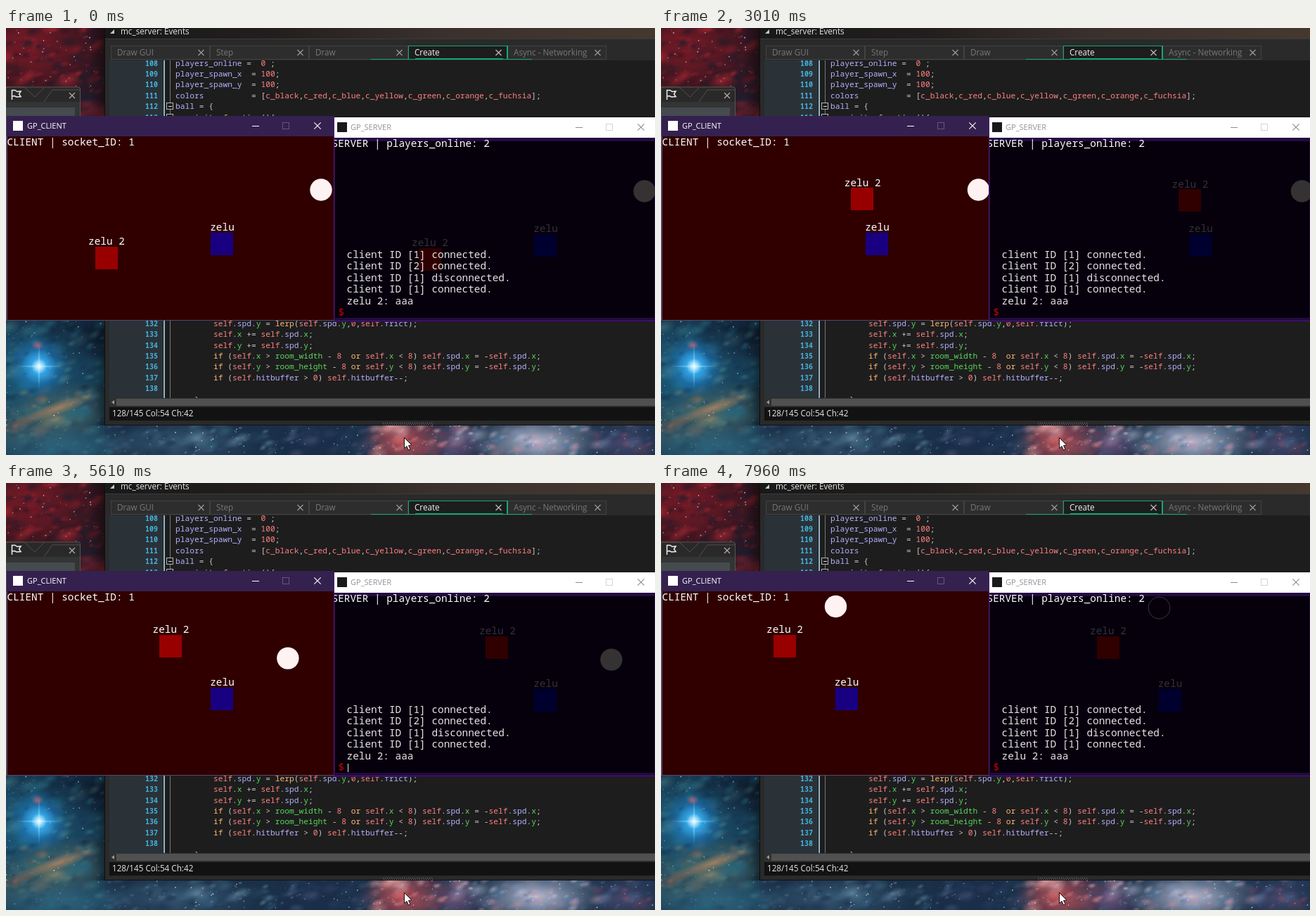
Write an HTML page with a canvas that moves like this. It is 923x607 px and loops after 8 s.

```html
<!DOCTYPE html>
<html lang="en">
<head>
<meta charset="utf-8">
<title>Client and server</title>
<style>
html, body { margin: 0; width: 100%; height: 100%; overflow: hidden; background: #111; }
canvas { display: block; width: 923px; height: 607px; }
</style>
</head>
<body>
<canvas id="stage" width="923" height="607"></canvas>
<script>
const W = 923, H = 607, LOOP = 8000, STEP = 46.3;
const UI = '11.7px "Open Sans", sans-serif';
const TITLE = '11px "Open Sans", sans-serif';
const CODE = '11.25px "Noto Sans Mono", monospace';
const GAME = '300 14.4px "Noto Sans Mono", monospace';
const NAME = 'zelu';

const view = document.getElementById('stage').getContext('2d');
const back = document.createElement('canvas');
back.width = W;
back.height = H;
let g = back.getContext('2d');

function rect(x, y, w, h, fill) {
  g.fillStyle = fill;
  g.fillRect(x, y, w, h);
}
function text(s, x, y, font, fill, align = 'left') {
  g.font = font;
  g.textAlign = align;
  g.fillStyle = fill;
  g.fillText(s, x, y);
}
function path(points, stroke, width = 1, fill) {
  g.beginPath();
  points.forEach(([x, y]) => g.lineTo(x, y));
  if (fill) {
    g.closePath();
    g.fillStyle = fill;
    g.fill();
  }
  if (stroke) {
    g.strokeStyle = stroke;
    g.lineWidth = width;
    g.stroke();
  }
}
function box(x, y, w, h, color) {
  g.strokeStyle = color;
  g.lineWidth = 1;
  g.strokeRect(x + 0.5, y + 0.5, w, h);
}
function cross(x, y, r, color, width = 1.2) {
  path([[x - r, y - r], [x + r, y + r]], color, width);
  path([[x + r, y - r], [x - r, y + r]], color, width);
}
function disc(x, y, r, fill, stroke) {
  g.beginPath();
  g.arc(x, y, r, 0, Math.PI * 2);
  g.lineWidth = 1;
  g.fillStyle = fill;
  g.strokeStyle = stroke;
  if (fill) g.fill();
  if (stroke) g.stroke();
}
function glow(x, y, rx, ry, rgb, alpha, angle = 0) {
  const fade = g.createRadialGradient(0, 0, 0, 0, 0, 1);
  fade.addColorStop(0, `rgba(${rgb},${alpha})`);
  fade.addColorStop(0.5, `rgba(${rgb},${alpha * 0.5})`);
  fade.addColorStop(1, `rgba(${rgb},0)`);
  g.save();
  g.translate(x, y);
  g.rotate(angle);
  g.scale(rx, ry);
  g.fillStyle = fade;
  g.fillRect(-1, -1, 2, 2);
  g.restore();
}
function clipped(x, y, w, h, draw) {
  g.save();
  g.beginPath();
  g.rect(x, y, w, h);
  g.clip();
  draw();
  g.restore();
}

let seed = 7;
function rnd() {
  seed = (seed * 16807) % 2147483647;
  return seed / 2147483647;
}
// Mottled cloud of small soft patches
function cloud(x, y, w, h, count, colors, alpha) {
  for (let i = 0; i < count; i++) {
    const r = 2 + rnd() * rnd() * 13;
    glow(x + rnd() * w, y + rnd() * h, r * 1.7, r, colors[i % colors.length], alpha * rnd(), -0.6 + rnd() * 0.6);
  }
}
function stars(x, y, w, h, count) {
  for (let i = 0; i < count; i++)
    disc(x + rnd() * w, y + rnd() * h, 0.3 + rnd() * 0.7, `rgba(225,235,245,${0.25 + rnd() * 0.6})`);
}

function nebula() {
  rect(0, 0, W, H, '#1a3048');
  rect(0, 0, 140, 126, '#35151f');
  glow(35, 30, 95, 60, '145,28,40', 0.8);
  glow(120, 95, 55, 50, '28,30,46', 0.9);
  cloud(0, 0, 140, 126, 260, ['160,38,48', '30,26,42', '110,24,36', '52,18,30'], 0.75);
  stars(0, 0, 140, 90, 50);

  rect(0, 415, 140, 192, '#173850');
  glow(115, 435, 75, 45, '12,24,42', 0.9);
  glow(30, 490, 100, 80, '30,105,140', 0.8);
  glow(60, 555, 110, 45, '95,120,105', 0.8, -0.3);
  glow(70, 600, 100, 28, '40,90,115', 0.8);
  cloud(0, 415, 140, 192, 280, ['35,105,130', '16,36,56', '75,130,135', '24,60,86'], 0.65);
  cloud(0, 515, 130, 60, 70, ['150,140,110', '60,100,105', '130,90,75'], 0.6);
  glow(75, 540, 55, 10, '195,140,100', 0.7, -0.35);
  glow(20, 562, 40, 10, '140,85,70', 0.5, -0.4);
  glow(45, 451, 9, 7, '225,85,80', 0.95);
  stars(0, 415, 140, 192, 75);

  glow(80, 592, 110, 36, '50,105,130', 0.7);
  glow(250, 590, 110, 34, '75,115,145', 0.6);
  glow(440, 590, 80, 40, '26,44,74', 0.9);
  glow(565, 588, 62, 42, '205,85,88', 0.95);
  glow(640, 590, 45, 34, '120,85,125', 0.85);
  glow(755, 588, 95, 40, '185,190,215', 0.95);
  glow(880, 590, 55, 34, '70,72,110', 0.9);
  cloud(140, 563, 270, 44, 150, ['120,160,185', '28,54,80', '60,105,135', '24,44,70'], 0.6);
  cloud(390, 563, 140, 44, 70, ['24,42,70', '85,95,130', '40,66,100'], 0.55);
  cloud(520, 563, 110, 44, 100, ['240,150,145', '140,45,60', '230,180,185', '110,50,75'], 0.6);
  cloud(630, 563, 220, 44, 130, ['215,220,235', '70,110,150', '215,150,165', '130,150,190'], 0.6);
  cloud(835, 563, 88, 44, 55, ['40,58,95', '150,75,95', '90,110,150'], 0.6);
  stars(140, 565, 783, 42, 140);

  glow(47, 481, 44, 44, '30,145,235', 0.85);
  glow(47, 481, 25, 25, '70,195,255', 1);
  glow(47, 481, 33, 2, '150,230,255', 0.7);
  glow(47, 481, 2, 33, '150,230,255', 0.7);
  glow(47, 481, 11, 11, '240,252,255', 1);
  const shade = g.createLinearGradient(118, 0, 140, 0);
  shade.addColorStop(0, 'rgba(0,0,0,0)');
  shade.addColorStop(1, 'rgba(0,0,0,.4)');
  rect(118, 0, 22, 565, shade);
}

function codeColor(word) {
  if (/^(self|\d+|c_\w+)$/.test(word)) return '#ff8080';
  if (/^(if|or|function|lerp)$/.test(word)) return '#ffb871';
  if (/^(x|y|room_\w+)$/.test(word)) return '#58d65a';
  return /^\w/.test(word) ? '#b2b1ff' : '#c8c8c8';
}
function codeLine(n, indent, source) {
  const y = 53.6 + (n - 108) * 15.42;
  text(n, 216, y, '600 10px "Noto Sans Mono", monospace', '#45b1dd', 'right');
  g.font = CODE;
  const em = g.measureText('0').width;
  for (const m of source.matchAll(/\w+|[^\w\s]+/g))
    text(m[0], 241 + (indent + m.index) * em, y, CODE, codeColor(m[0]));
}
function fold(y) {
  rect(228, y, 10, 10, '#1c1c1c');
  box(228, y, 9, 9, '#b5b5b5');
  rect(231, y + 5, 5, 1, '#ddd');
}

function editor() {
  rect(140, 0, 783, 565, '#2a2a2a');
  const top = g.createLinearGradient(140, 0, W, 0);
  top.addColorStop(0, '#191919');
  top.addColorStop(0.3, '#221e1d');
  top.addColorStop(0.6, '#3a302d');
  top.addColorStop(1, '#45382f');
  rect(140, 0, 783, 15, top);
  rect(140, 15, 783, 1, '#3b3b3b');
  rect(140, 0, 1, 565, '#0e0e0e');
  path([[148, 8], [154, 8], [154, 2]], null, 1, '#c8c8c8');
  text('mc_server: Events', 163, 9, UI, '#e4e4e4');

  rect(147, 46, 776, 480, '#1d1d1d');
  rect(147, 46, 76, 480, '#2a3238');
  rect(224, 46, 2, 480, '#8eb4c6');
  rect(233, 46, 1, 480, '#777');
  clipped(147, 46, 776, 480, () => {
    codeLine(108, 0, 'players_online =  0 ;');
    codeLine(109, 0, 'player_spawn_x  = 100;');
    codeLine(110, 0, 'player_spawn_y  = 100;');
    codeLine(111, 0, 'colors          = [c_black,c_red,c_blue,c_yellow,c_green,c_orange,c_fuchsia];');
    codeLine(112, 0, 'ball = {');
    codeLine(113, 4, 'init: function(){');
    codeLine(132, 8, 'self.spd.y = lerp(self.spd.y,0,self.frict);');
    codeLine(133, 8, 'self.x += self.spd.x;');
    codeLine(134, 8, 'self.y += self.spd.y;');
    codeLine(135, 8, 'if (self.x > room_width - 8  or self.x < 8) self.spd.x = -self.spd.x;');
    codeLine(136, 8, 'if (self.y > room_height - 8 or self.y < 8) self.spd.y = -self.spd.y;');
    codeLine(137, 8, 'if (self.hitbuffer > 0) self.hitbuffer--;');
    codeLine(138, 0, '');
    text('}', 268, 532, CODE, '#c8c8c8');
    fold(106);
    fold(122);
  });

  const green = '#14a870';
  ['Draw GUI', 'Step', 'Draw', 'Create', 'Async - Networking'].forEach((name, i) => {
    const x = 149 + i * 141, on = i === 3;
    rect(x, 26, 140, 19, on ? '#1d1d1d' : '#2d2d2d');
    box(x, 25, 140, 19, on ? green : '#424242');
    text(name, x + 9, 39, UI, on ? '#efefef' : '#777');
    cross(x + 128.5, 35, 4, on ? '#bbb' : '#999');
  });
  rect(519, 44, 54, 1, green);
  rect(713, 44, 35, 1, green);
  rect(572, 25, 1, 20, green);
  rect(713, 25, 1, 20, green);
  rect(582, 43, 125, 2, green);

  rect(147, 526, 776, 12, '#303030');
  rect(157, 527, 766, 10, '#505050');
  path([[150, 532], [154, 529], [154, 535]], null, 1, '#999');
  rect(147, 539, 776, 19, '#121212');
  text('128/145 Col:54 Ch:42', 151, 552, UI, '#e6e6e6');
  rect(140, 564, 783, 1, '#111');
  for (let x = 536; x < 608; x += 3) {
    rect(x, 561, 1, 1, '#777');
    rect(x + 1, 563, 1, 1, '#777');
  }
}

function sidePanel() {
  path([[0, 84], [104, 84], [105.5, 86], [105.5, 126], [0, 126]], '#555', 1, '#292929');
  path([[0, 84], [26, 84], [41, 98], [54, 85]], '#5a4c42');
  path([[54, 105], [66, 88], [105, 88]], '#5a4c42');
  rect(0, 105, 105, 21, '#343434');
  rect(0, 113, 98, 13, '#454b4e');
  path([[8.5, 102], [8.5, 88.5], [13, 88.5], [16, 90.5], [21, 90], [18.5, 94], [21, 97.5], [15, 98], [12, 96.5], [8.5, 97]], '#eee', 1.5);
  cross(94, 96, 4, '#aaa');
}

function frameButtons(x, y, color, dim) {
  rect(x - 93, y, 10, 1, color);
  box(x - 50, y - 5, 9, 9, dim);
  cross(x, y, 4.7, color, 1.1);
}

function windows() {
  rect(466, 127, 457, 291, '#240a42');
  rect(466, 127, 1, 291, '#4a1c78');
  rect(467, 127, 456, 29, '#fff');
  rect(471, 134, 14, 14, '#1a1a1a');
  text('GP_SERVER', 490, 145, TITLE, '#96909a');
  frameButtons(903, 141, '#8f8a94', '#d5d3d7');
  rect(468, 161, 454, 251, '#06000c');
  rect(467, 416, 456, 1, '#4a1c78');

  rect(0, 125, 466, 291, '#57476a');
  rect(1, 125, 465, 29, '#35214f');
  rect(10, 132, 14, 14, '#fff');
  text('GP_CLIENT', 30, 143, TITLE, '#fff');
  frameButtons(443, 139, '#fff', '#66557f');
  rect(2, 154, 464, 261, '#300000');
}

nebula();
editor();
sidePanel();
windows();

// [time, x, y] corners of each path, joined by straight moves
const redPath = [
  [504, 142.5, 326.5], [780, 192, 326.5], [1064, 192, 326.5], [1340, 252.5, 326.5],
  [1624, 252.5, 326.5], [2450, 418, 243], [2500, 418, 243], [3030, 278, 243],
  [3480, 400, 243], [3520, 398.5, 243], [4120, 265.5, 243], [4430, 265.5, 243],
  [4665, 265.5, 194], [4780, 265.5, 172], [4930, 265.5, 172], [5140, 287, 222],
  [5330, 287, 231.5], [5880, 175.5, 231.5]
];
const ballPath = [
  [2370, 448, 230], [2490, 454, 230], [3290, 450, 230], [3520, 435, 230],
  [4120, 301, 230], [4665, 309, 230], [5140, 315, 230], [5850, 450, 260],
  [6425, 364, 286], [7225, 251, 170], [7560, 205, 220], [7950, 248.5, 175.5]
];
const bluePath = [[7730, 307, 306.5], [7950, 263.5, 306.5]];
const hits = [2380, 3440, 4110, 5140, 7540];

function at(steps, t) {
  const i = steps.findIndex(s => s[0] > t);
  if (i <= 0) return (i ? steps[steps.length - 1] : steps[0]).slice(1);
  const [a, b] = [steps[i - 1], steps[i]];
  const k = (t - a[0]) / (b[0] - a[0]);
  return [a[1] + (b[1] - a[1]) * k, a[2] + (b[2] - a[2]) * k];
}
function player([x, y], name, fill, ink) {
  rect(Math.round(x - 16), Math.round(y - 16), 32, 32, fill);
  text(name, x + 0.5, y - 18.5, GAME, ink, 'center');
}

function draw(time) {
  const t = Math.max(0, Math.floor((time - 545) / STEP) * STEP + 545);
  const blue = at(bluePath, t), ball = at(ballPath, t);

  g.drawImage(back, 0, 0);
  clipped(2, 154, 464, 261, () => {
    player(blue, NAME, '#190080', '#fff');
    player(at(redPath, t), NAME + ' 2', '#980000', '#fff');
    disc(...ball, 15.7, '#fff2f2');
    text('CLIENT | socket_ID: 1', 1.5, 167, GAME, '#fff');
  });
  clipped(467, 156, 456, 256, () => {
    g.save();
    g.translate(460, 2);
    player(blue, NAME, '#00002f', '#343136');
    // The remote player arrives slightly late
    player(at(redPath, t - 22), NAME + ' 2', '#300000', '#343136');
    const hit = hits.some(h => t >= h && t < h + 450);
    if (hit) disc(...ball, 15.5, null, '#3a363d');
    else disc(...ball, 15.7, '#343233');
    g.restore();
    text('SERVER | players_online: 2', 463.5, 169, GAME, '#fff');
    ['client ID [1] connected.', 'client ID [2] connected.', 'client ID [1] disconnected.',
      'client ID [1] connected.', NAME + ' 2: aaa']
      .forEach((s, i) => text(s, 484.5, 327 + i * 16.4, GAME, '#e6e2e6'));
    text('$', 472.5, 409, GAME, '#c80000');
    // Caret: lit for 590 ms of every 970
    if (time >= 370 && (time - 370) % 970 < 590) rect(486, 399, 1, 12, '#e6e2e6');
  });
  path([[566.5, 582.5], [566.5, 597.5], [570, 594.5], [572.5, 600], [575, 599], [572.5, 593.5], [577, 593]], '#111', 1, '#fff');
}

g = view;
const start = performance.now();
function tick() {
  draw((performance.now() - start) % LOOP);
  requestAnimationFrame(tick);
}
tick();
</script>
</body>
</html>
```
